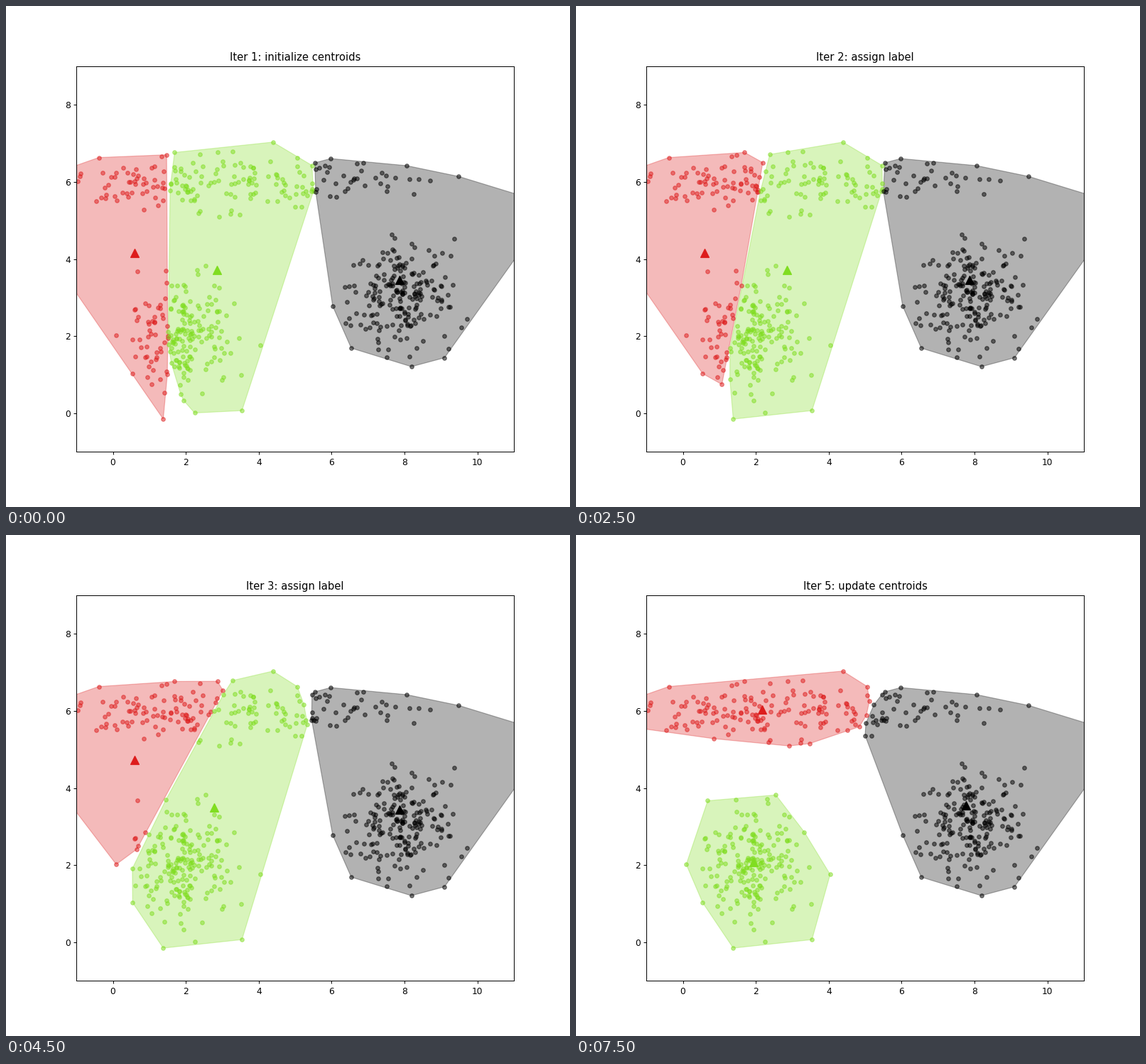
Recreate the animation shown at these times as a matplotlib script. Size 794x706 px, loop 8 s.

```python
import numpy as np
import matplotlib.pyplot as plt
from matplotlib.animation import FuncAnimation
from matplotlib.path import Path

COLORS = ["#dd1c1c", "#80dd20", "#000000"]

# Path of each centroid through the k-means steps.
RED = [(0.93, 3.02), (0.60, 4.16), (0.60, 4.73),
       (0.80, 5.76), (1.55, 6.05), (2.18, 6.03)]
GREEN = [(2.10, 3.02), (2.85, 3.72), (2.78, 3.50),
         (2.56, 3.15), (2.27, 2.62), (1.93, 2.07)]
BLACK = [(8.98, 3.02), (7.86, 3.45), (7.86, 3.44),
         (7.82, 3.48), (7.74, 3.58), (7.76, 3.55)]
CENTROIDS = np.stack([RED, GREEN, BLACK], axis=1)

# Key points that bound the three clouds.
LEFT = [(0.09, 2.02), (0.68, 3.67), (2.55, 3.82), (3.33, 2.86),
        (4.04, 1.76), (3.54, 0.07), (1.38, -0.15), (0.54, 1.03)]
RIGHT = [(6.03, 2.78), (6.54, 1.69), (8.19, 1.21), (9.10, 1.44),
         (9.72, 2.44), (9.37, 4.52), (7.65, 4.63), (6.60, 3.85)]
BAND = [(-2.95, 5.78), (-0.39, 6.63), (1.33, 6.66), (2.19, 6.50),
        (3.02, 6.53), (4.39, 7.03), (5.06, 6.63), (5.57, 6.33),
        (6.70, 6.47), (8.06, 6.42), (9.49, 6.14), (12.08, 5.39),
        (5.50, 5.75), (5.00, 5.36), (3.47, 5.15), (2.91, 5.09),
        (0.84, 5.28)]


def half_hull(points):
    chain = []
    for x, y in points:
        while len(chain) > 1:
            (ax_, ay), (bx, by) = chain[-2:]
            if (bx - ax_) * (y - ay) > (by - ay) * (x - ax_):
                break
            chain.pop()
        chain.append((x, y))
    return chain[:-1]


def convex_hull(points):
    """Counter-clockwise corners of the hull."""
    ordered = sorted(map(tuple, points))
    return np.array(half_hull(ordered) + half_hull(ordered[::-1]))


def cloud(rng, mean, spread, keys, count=200):
    """Normal points within the hull of the key points, plus those keys."""
    points = rng.normal(mean, spread, (4 * count, 2))
    within = Path(convex_hull(keys)).contains_points(points)
    return np.vstack([keys, points[within][:count - len(keys)]])


def assign(points, centers):
    gaps = points[:, None] - centers
    return (gaps ** 2).sum(axis=2).argmin(axis=1)


rng = np.random.default_rng(7)
data = np.vstack([
    cloud(rng, (1.95, 2.1), (0.77, 0.80), LEFT),
    cloud(rng, (3.0, 6.0), (2.5, 0.35), BAND),
    cloud(rng, (7.95, 3.05), (0.73, 0.77), RIGHT),
])

groups = []
for centers in CENTROIDS[:-1]:
    labels = assign(data, centers)
    groups.append([data[labels == k] for k in range(3)])
hulls = [[convex_hull(group) for group in step] for step in groups]

fig, ax = plt.subplots(figsize=(9, 8), dpi=88.25)  # 794 x 706 pixels
ax.set_xlim(-1, 11)
ax.set_ylim(-1, 9)
title = ax.set_title("")

areas, dots, marks = [], [], []
for color in COLORS:
    areas += ax.fill([0, 0, 0], [0, 0, 0], color=color, alpha=0.3, lw=1)
    dots += ax.plot([], [], "o", color=color, ms=4.5, mew=1, alpha=0.5)
    marks += ax.plot([], [], "^", color=color, ms=10, mew=1, zorder=3)


def update(frame):
    step, assigning = divmod((frame + 1) // 2, 2)
    if assigning:
        action = "assign label"
    else:
        action = "update centroids" if step else "initialize centroids"
    title.set_text(f"Iter {step + 1}: {action}")

    centers = CENTROIDS[step if assigning else step + 1]
    for k, (x, y) in enumerate(centers):
        areas[k].set_xy(hulls[step][k])
        dots[k].set_data(*groups[step][k].T)
        marks[k].set_data([x], [y])
    return [title, *areas, *dots, *marks]


anim = FuncAnimation(fig, update, frames=16, interval=500, repeat=True,
                     repeat_delay=0, blit=False)
plt.show()
```
